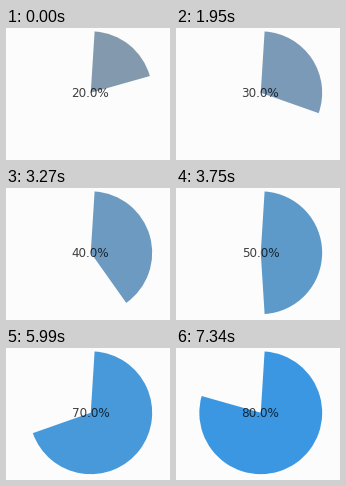
Animation, 164 px wide and 132 px high, one loop 8000 ms. Source, as a matplotlib script:

```python
import matplotlib.pyplot as plt
from matplotlib.animation import FuncAnimation
from matplotlib.patches import Wedge

W, H, DPI = 164, 132, 100
LOOP, STEP = 8000, 10
CX, CY, R = 84.75, 64.75, 61.4
START = 3.6  # degrees clockwise from the top

# start time in ms, percent shown, end angle, colour
STAGES = [
    (0, 20, 74.2, "#839aae"),
    (1050, 30, 109.4, "#7a9ab7"),
    (2550, 40, 144.7, "#6c9ac0"),
    (3750, 50, 176.4, "#5e9ac9"),
    (4800, 60, 215.3, "#5399d2"),
    (5990, 70, 250.6, "#4899da"),
    (7340, 80, 285.8, "#3b97e2"),
]

fig = plt.figure(figsize=(W / DPI, H / DPI), dpi=DPI, facecolor="#fcfcfc")
ax = fig.add_axes([0, 0, 1, 1])
ax.set(xlim=(0, W), ylim=(H, 0))
ax.axis("off")

# the y axis points down, so angles grow clockwise
pie = ax.add_patch(Wedge((CX, CY), R, START - 90, START - 89, lw=0))
label = ax.text(84.5, 69, "", ha="center", va="baseline", alpha=0.75,
                family="DejaVu Sans", size=12 * 72 / DPI, color="black")


def update(i):
    t = i * STEP
    _, percent, end, color = [s for s in STAGES if s[0] <= t][-1]
    pie.set_theta2(end - 90)
    pie.set_facecolor(color)
    label.set_text(f"{percent:.1f}%")
    return pie, label


anim = FuncAnimation(fig, update, frames=LOOP // STEP, interval=STEP,
                     repeat=True, repeat_delay=0)
plt.show()
```
